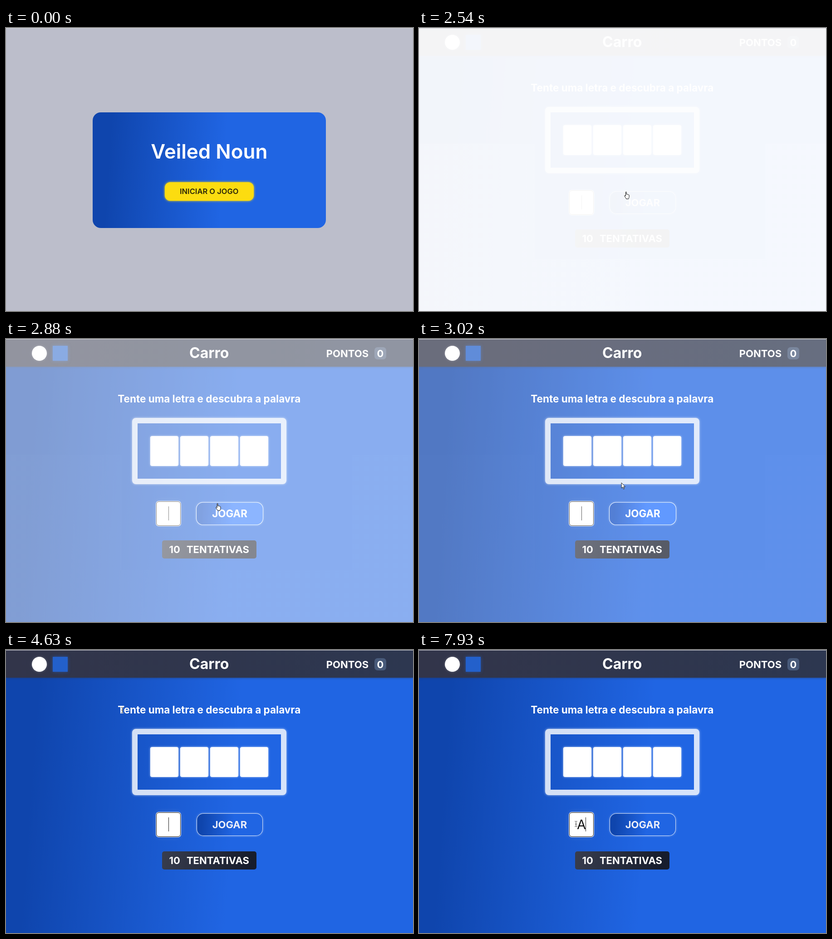
Animation of 897 by 624 pixels, one loop 8000 ms. Source, as an HTML page:

```html
<!DOCTYPE html>
<html lang="pt">
<head>
<meta charset="utf-8">
<title>Jogo de palavras</title>
<style>
html, body { margin: 0; width: 897px; height: 624px; overflow: hidden; background: #fff; }
body { position: relative; font: 700 22px/1 Inter, Roboto, sans-serif; color: #fff; white-space: nowrap; }
div, svg { position: absolute; box-sizing: border-box; }
.page { inset: 0; }
.blue { background: linear-gradient(94deg, #0f45ad 8%, #2065e3 56%); }
.box { display: flex; align-items: center; justify-content: center; }
.text { left: 447.75px; transform: translate(-50%, -50%); }
#start { background: #bcbecb; }
#card { left: 191px; top: 186px; width: 513.5px; height: 254.5px; border-radius: 18px; }
#begin { left: 350px; top: 340px; width: 195.5px; height: 41px; border-radius: 12px; color: #2a2508; font-size: 16.5px; font-weight: 600; }
#head { left: 0; top: 0; width: 897px; height: 61px; background: linear-gradient(95deg, #32354a, #2d3750); box-shadow: 0 1px 4px #2c365299; }
#circle, #square { left: 57px; top: 15px; width: 33px; height: 33px; border-radius: 50%; background: #fff; box-shadow: 0 0 5px #fff4; }
#square { left: 102.5px; border-radius: 0; background: #2360cb; box-shadow: 0 0 7px #2360cb99; }
#score { left: 812px; top: 18px; width: 26px; height: 27px; border-radius: 7px; background: #485a7a; }
#board { left: 278px; top: 174px; width: 339.5px; height: 146px; gap: 4.5px; border: 12px solid #ffffffd0; border-radius: 8px; box-shadow: 0 0 5px #fff9; }
#board i { width: 61.5px; height: 66px; border-radius: 4px; background: #fff; box-shadow: 0 0 4px #fffa; }
#input { left: 331px; top: 357.5px; width: 54px; height: 54px; border-radius: 6px; background: #fff; border: 1.5px solid #111; box-shadow: 0 0 0 1px #fff, 0 0 14px #ffffff20; color: #111; font-size: 29px; font-weight: 400; }
#caret { top: 369px; width: 1px; height: 31px; background: #222; }
#play { left: 420px; top: 360px; width: 146px; height: 49.5px; border-radius: 15px; border: 1px solid #ffffffd0; box-shadow: 0 0 4px #fff6; color: #eceef8; }
#tries { left: 343.5px; top: 444px; width: 208.5px; height: 39.5px; gap: 14px; border-radius: 5px; background: linear-gradient(100deg, #383d4e, #171d2d 90%); }
#line { left: 0; top: 0; width: 897px; height: 1px; background: #d0d1d8; }
#cursor { left: 0; top: 0; overflow: visible; stroke-linejoin: round; }
</style>
</head>
<body>
<div class="page" id="start">
  <div class="blue" id="card"></div>
  <div class="text" style="top:272px;font-size:44px;font-weight:600">Veiled Noun</div>
  <div class="box" id="begin">INICIAR O JOGO</div>
</div>
<div class="page blue" id="game">
  <div id="head"></div>
  <div id="circle"></div>
  <div id="square"></div>
  <div class="text" style="top:31px;font-size:32px">Carro</div>
  <div class="text" style="left:752.5px;top:31.5px">PONTOS</div>
  <div class="box" id="score">0</div>
  <div class="text" style="top:131.5px;font-size:22.5px">Tente uma letra e descubra a palavra</div>
  <div class="box" id="board"><i></i><i></i><i></i><i></i></div>
  <div class="box" id="input"></div>
  <div id="caret"></div>
  <div class="box blue" id="play">JOGAR</div>
  <div class="box" id="tries"><span>10</span><span>TENTATIVAS</span></div>
</div>
<div id="line"></div>
<svg id="cursor" width="12" height="18">
  <defs><path id="bar" d="M.5 .5H2L3 1.5 4 .5H5.5M3 1.5V11.5M.5 12.5H2L3 11.5 4 12.5H5.5M1.5 7H4.5"/></defs>
  <path id="arrow" fill="#fff" stroke="#222" d="M.5 .5V12.5L3.2 10 5.2 14.6 7 13.8 5 9.4H8.8Z"/>
  <path id="hand" fill="#fff" stroke="#111" d="M3.2 1.4C3.2 .3 5 .3 5 1.4V6.2C5.6 5.4 7 5.6 7.1 6.6 7.7 6 9 6.2 9.1 7.2 9.8 6.8 10.9 7.2 10.9 8.2V11.5C10.9 13 10 14 9.6 16.2H4.4C4 14 1.5 12 .6 9.8 .2 8.6 1.6 8 2.4 9L3.2 10Z"/>
  <g id="beam" fill="none">
    <use href="#bar" stroke="#fff" stroke-width="2.2"/>
    <use href="#bar" stroke="#333"/>
  </g>
</svg>
<script>
const $ = id => document.getElementById(id);
const show = (id, on) => $(id).style.visibility = on ? 'visible' : 'hidden';
const ramp = (t, a, b) => Math.min(1, Math.max(0, (t - a) / (b - a)));
const ease = k => k * k * (3 - 2 * k);
const mix = (a, b, k) => a + (b - a) * k;

// The pointer glides between these stops: time, x, y
const stops = [
  [460, 843, 602], [600, 779, 525], [800, 779, 525], // enters and waits
  [1440, 404, 351], [2680, 454, 361], [2880, 462, 362], // start button
  [3240, 414, 228], [3700, 470, 24], // up to the title
  [4600, 251, 126], [5250, 582, 130], // along the headline
  [5970, 103, 36], [6640, 72, 28], // icons
  [7120, 334, 382], [7470, 343, 377] // letter box
];

function pointAt(t) {
  let [, x, y] = stops[0];
  for (let i = 1; i < stops.length; i++) {
    const [t0, x0, y0] = stops[i - 1], [t1, x1, y1] = stops[i];
    const k = ease(ramp(t, t0, t1));
    x += (x1 - x0) * k;
    y += (y1 - y0) * k;
  }
  return [x, y];
}

function pointerKind(x, y, playing) {
  const over = (l, t, r, b) => x >= l && x <= r && y >= t && y <= b;
  if (!playing) return over(346, 335, 545, 381) ? 'hand' : 'arrow';
  if (over(55, 12, 137, 50) || over(416, 355, 568, 410)) return 'hand';
  if (over(238, 110, 654, 142) || over(400, 12, 492, 42) || over(326, 355, 386, 412)) return 'beam';
  return 'arrow';
}

function draw(t) {
  const playing = t >= 2540, typed = t >= 7930;
  $('start').style.display = playing ? 'none' : 'block';
  $('game').style.display = playing ? 'block' : 'none';
  $('game').style.opacity = ramp(t, 2508, 3220);

  const hot = ramp(t, 1220, 1420), begin = $('begin').style;
  begin.transform = `scale(${1 + .02 * hot})`;
  begin.background = `rgb(${mix(252, 255, hot)},${mix(220, 255, hot)},${mix(16, 18, hot)})`;
  begin.boxShadow = `0 0 ${mix(5, 11, hot)}px rgb(255,${mix(220, 255, hot)},18)`;

  const lift = ramp(t, 2600, 2880) * (1 - ramp(t, 3000, 3380));
  $('play').style.transform = `scale(${1 + .014 * lift})`;
  $('play').style.filter = `brightness(${1 + .15 * lift})`;

  $('input').textContent = typed ? 'A' : '';
  show('caret', playing && ((t - 2540) % 1000 < 500 || t >= 7470));
  $('caret').style.left = typed ? '367px' : '357.5px';

  const [x, y] = pointAt(t), kind = pointerKind(x, y, playing);
  for (const id of ['arrow', 'hand', 'beam']) show(id, t >= 460 && id === kind);
  $('cursor').style.transform = `translate(${x}px,${y}px)`;
}

const began = performance.now();
function tick() {
  draw((performance.now() - began) % 8000);
  requestAnimationFrame(tick);
}
tick();
</script>
</body>
</html>
```
